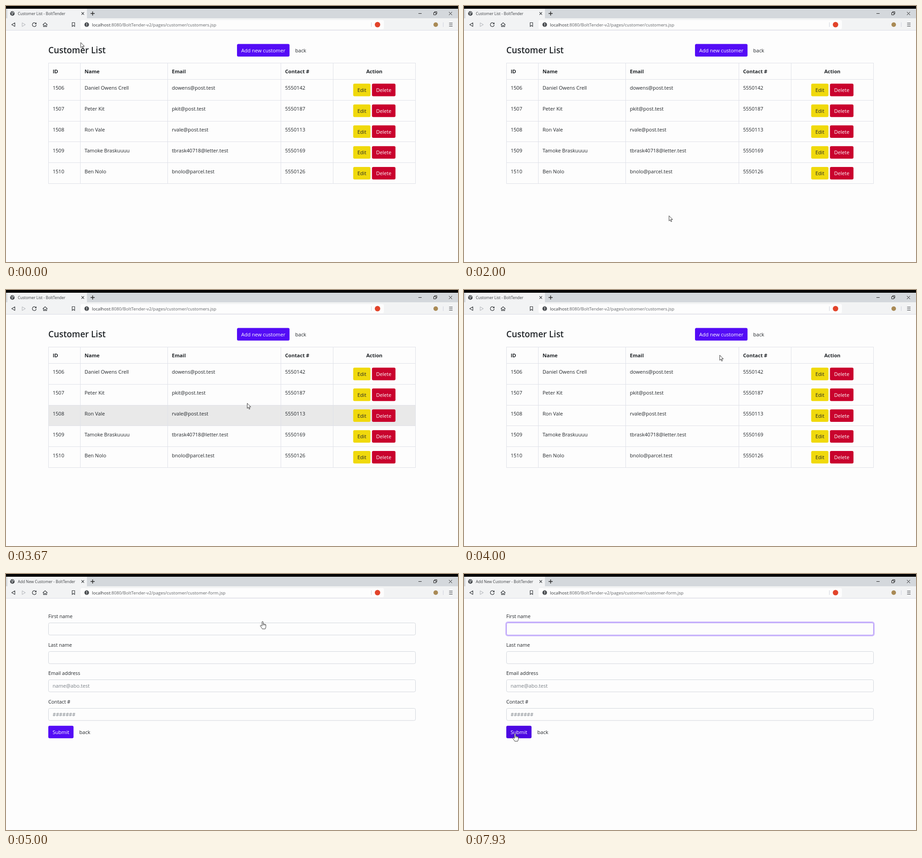
An HTML page that plays this animation: 994x563 px, repeating every 8000 ms.

```html
<!DOCTYPE html>
<html lang="en">
<head>
<meta charset="utf-8">
<title>Customer admin</title>
<style>
html, body { margin: 0; width: 100%; height: 100%; overflow: hidden; background: #fdfdfd; }
svg { display: block; width: 100vw; height: 100vh; }
text { font-family: "Open Sans", "Noto Sans", sans-serif; font-size: 11.1px; fill: #212529; white-space: pre; }
</style>
</head>
<body>
<svg id="stage" viewBox="0 0 994 563"></svg>
<script>
const LOOP = 8000;
const PAGE_SWITCH = 4870, FOCUS = 5960, CARET_HALF = 530;
const HOVER_LAG = 30;
const PRIMARY = '#540cf6', PRIMARY_HOVER = '#4c08e2', LINE = '#dfe1e8';
const APP = 'BoltTender';

const stage = document.getElementById('stage');

function add(parent, tag, attrs, content) {
  const node = document.createElementNS('http://www.w3.org/2000/svg', tag);
  for (const key in attrs) node.setAttribute(key, attrs[key]);
  if (content !== undefined) node.textContent = content;
  parent.appendChild(node);
  return node;
}
const group = (parent, attrs = {}) => add(parent, 'g', attrs);
const rect = (parent, x, y, width, height, fill, more = {}) =>
  add(parent, 'rect', { x, y, width, height, fill, ...more });
const text = (parent, x, y, content, more = {}) => add(parent, 'text', { x, y, ...more }, content);
const stroke = (parent, d, color, width = 1, more = {}) =>
  add(parent, 'path', { d, fill: 'none', stroke: color, 'stroke-width': width, ...more });
const circle = (parent, cx, cy, r, fill) => add(parent, 'circle', { cx, cy, r, fill });
const show = (node, on) => node.setAttribute('visibility', on ? 'visible' : 'hidden');

function button(parent, x, y, w, label, fill, color) {
  const box = rect(parent, x, y, w, 27.6, fill, { rx: 3 });
  text(parent, x + w / 2, y + 18.2, label, { 'text-anchor': 'middle', style: `fill:${color}` });
  return box;
}

// Browser window
function buildChrome() {
  const g = group(stage);
  const ink = '#3b3e42';
  rect(g, 0, 0, 994, 563, '#fdfdfd');
  rect(g, 0, 0, 994, 6, '#000');
  rect(g, 0, 6, 994, 21, '#d4d8dc');
  rect(g, 3, 6, 175, 21, '#f2f3f4');
  rect(g, 0, 27, 994, 26.5, '#f2f3f4');
  rect(g, 0, 53, 994, 1, '#dcdde6');
  rect(g, 164, 31, 667, 20, '#fdfdfd', { rx: 3 });

  circle(g, 14, 16.5, 5, '#45494d');
  stroke(g, 'M10.5 14.5l3 1 1 2-2 2M14.5 12.5l1 2 2.5 1', '#dfe1e3', 1.2);
  stroke(g, 'M166 13.7l5.6 5.6M171.6 13.7l-5.6 5.6', '#303336', 1.2);
  stroke(g, 'M186 16.5h9M190.5 12v9', '#222', 1.4);
  stroke(g, 'M907 16.5h7', '#222', 1);
  stroke(g, 'M940.5 14.5h5v5h-5zM942.5 14.5v-2h5v5h-2', '#222', 1);
  stroke(g, 'M974 13l7 7M981 13l-7 7', '#222', 1);

  stroke(g, 'M19.5 37v8l-7-4z', ink, 1.2, { 'stroke-linejoin': 'round' });
  stroke(g, 'M35.5 37v8l7-4z', '#b9bcc0', 1.1, { 'stroke-linejoin': 'round' });
  stroke(g, 'M65.5 38.2A4.3 4.3 0 1 0 66.5 41.5', ink, 1.3);
  add(g, 'path', { d: 'M67 36v4h-4z', fill: ink });
  stroke(g, 'M81 41.2l5-4.5 5 4.5M82.5 40.5v5h2.5v-3h2v3h2.5v-5', ink, 1.2);
  stroke(g, 'M145.5 36.5h5.5v8.5l-2.75-2.3-2.75 2.3z', ink, 1.2);
  circle(g, 177.5, 41, 5, '#4a4d51');
  stroke(g, 'M177.5 38v3.6M177.5 42.8v1.4', '#fff', 1.3);
  stroke(g, 'M803.5 36v10M961.5 36v10', '#cfd1dc');
  circle(g, 817, 41, 6, '#e2432a');
  circle(g, 945, 41, 5, '#a98a55');
  stroke(g, 'M974.5 37.5h7.5M974.5 41h7.5M974.5 44.5h7.5', ink, 1.2);

  const title = text(g, 26, 19.6, '', { style: 'font-size:8.45px;fill:#3c3f43' });
  const url = text(g, 189, 44.6, '', { style: 'font-size:9.65px;fill:#5f6266' });
  add(url, 'tspan', { style: 'fill:#303337' }, 'localhost');
  const path = add(url, 'tspan', {});
  return { title, path };
}

// Customer table
const COLS = [93.5, 163.5, 355.5, 604.5, 719.5, 900.5];
const ROW_TOP = 161.5, ROW_H = 45.8;
const CUSTOMERS = [
  ['1506', 'Daniel Owens Crell', 'dowens@post.test', '5550142'],
  ['1507', 'Peter Kit', 'pkit@post.test', '5550187'],
  ['1508', 'Ron Vale', 'rvale@post.test', '5550113'],
  ['1509', 'Tamoke Braskuuuu', 'tbrask40718@letter.test', '5550169'],
  ['1510', 'Ben Nolo', 'bnolo@parcel.test', '5550126']
];

function buildList() {
  const g = group(stage);
  text(g, 93, 104, 'Customer List', { style: 'font-size:18.9px;font-weight:600' });
  const addBox = button(g, 508, 83.6, 115.5, 'Add new customer', PRIMARY, '#fff');
  text(g, 636, 101.8, 'back');

  const rows = CUSTOMERS.map((customer, i) => {
    const top = ROW_TOP + i * ROW_H;
    const shade = rect(g, 93.5, top, 807, ROW_H, 'none');
    customer.forEach((cell, c) => text(g, COLS[c] + 9.2, top + 22.8, cell));
    button(g, 763.5, top + 9.3, 38, 'Edit', '#f0d90c', '#24272b');
    button(g, 804.8, top + 9.3, 51.7, 'Delete', '#c9022d', '#fff');
    return shade;
  });

  const bold = { style: 'font-weight:700' };
  ['ID', 'Name', 'Email', 'Contact #'].forEach((h, c) => text(g, COLS[c] + 9.2, 147.7, h, bold));
  text(g, 810, 147.7, 'Action', { ...bold, 'text-anchor': 'middle' });

  let grid = 'M93 125.5H901';
  for (let i = 0; i <= CUSTOMERS.length; i++) grid += `M93 ${Math.floor(ROW_TOP + i * ROW_H) + 0.5}H901`;
  for (const x of COLS) grid += `M${x} 125V391`;
  stroke(g, grid, LINE);
  return { g, addBox, rows };
}

// New customer form
const FIELDS = [
  ['First name', ''],
  ['Last name', ''],
  ['Email address', 'name@abo.test'],
  ['Contact #', '#######']
];
const fieldTop = i => 107 + i * 62.5;

function buildForm() {
  const g = group(stage);
  const glow = rect(g, 92.3, 105.9, 809.4, 29.7, 'none', { rx: 4, stroke: PRIMARY, 'stroke-width': 2.6 });
  const boxes = FIELDS.map(([label, hint], i) => {
    const y = Math.round(fieldTop(i));
    text(g, 93, y - 10.2, label, { style: 'font-size:10.8px' });
    const box = rect(g, 93.5, y + 0.5, 807, 26.7, '#fdfdfd', { rx: 3, stroke: '#d2d6dc' });
    text(g, 102.5, y + 18.3, hint, { style: 'fill:#7a8087' });
    return box;
  });
  const caret = rect(g, 102.5, 113.5, 1, 15, '#333');
  const submit = button(g, 93, 333.7, 55.5, 'Submit', PRIMARY, '#fff');
  text(g, 161.3, 352, 'back');
  return { g, glow, first: boxes[0], caret, submit };
}

// Pointer shapes, drawn around their hot spot
function buildPointers() {
  const arrow = group(stage), hand = group(stage), beam = group(stage);
  const outline = { fill: '#fff', stroke: '#222', 'stroke-width': 0.9, 'stroke-linejoin': 'round' };
  add(arrow, 'path', { d: 'M.4 .4V11.6L2.9 9.2 4.7 13.4 6.4 12.7 4.6 8.5H8.3Z', ...outline });
  add(hand, 'path', {
    d: 'M-1.5 9.5V1.6Q-1.5 .4 -.3 .4T1 1.6V6Q2.2 5 3.2 6.3Q4.5 5.5 5.2 7Q7 6.5 7 8.3V11.5Q7 14 5.5 16.8H-.8Q-2 14.5 -5 10.8Q-5.8 9.3 -4.4 8.8Q-3 8.6 -1.5 10.5Z',
    ...outline
  });
  stroke(hand, 'M1 6V9M3.2 6.5V9M5.2 7.2V9.2', '#222', 0.8);
  stroke(beam, 'M-3 -7.5H-.8L0 -6.9 .8 -7.5H3M0 -6.9V6.9M-3 7.5H-.8L0 6.9 .8 7.5H3', '#333', 1);
  return { arrow, hand, beam };
}

// Pointer path: time, x, y, and 1 where the move into the point is linear
const PATH = [
  [0, 164, 80], [200, 164, 80], [950, 440, 417], [1770, 440, 417], [1930, 450.5, 461],
  [3490, 450.5, 461], [3670, 530, 249, 1], [4000, 562, 143, 1], [4150, 564.5, 104],
  [5370, 564.5, 104], [5600, 460, 132, 1], [5900, 245, 130], [6330, 245, 130],
  [6480, 243, 207], [6640, 243, 207], [6780, 240.5, 182], [7700, 240.5, 182],
  [7900, 112.5, 351], [LOOP, 112.5, 351]
];

function pointerAt(t) {
  const i = Math.max(1, PATH.findIndex(p => p[0] >= t));
  const [t0, x0, y0] = PATH[i - 1], [t1, x1, y1, linear] = PATH[i];
  const u = Math.min(1, Math.max(0, (t - t0) / (t1 - t0)));
  const k = linear ? u : u * u * (3 - 2 * u);
  return { x: x0 + (x1 - x0) * k, y: y0 + (y1 - y0) * k };
}

const inside = (p, x, y, w, h) => p.x >= x && p.x < x + w && p.y >= y && p.y < y + h;

const chrome = buildChrome();
const list = buildList();
const form = buildForm();
const pointers = buildPointers();

function drawList(hover) {
  const row = inside(hover, 93, ROW_TOP, 808, ROW_H * 5) ? Math.floor((hover.y - ROW_TOP) / ROW_H) : -1;
  list.rows.forEach((shade, i) => shade.setAttribute('fill', i === row ? '#e9e9e9' : 'none'));
  const onAdd = inside(hover, 508, 84, 115, 27);
  list.addBox.setAttribute('fill', onAdd ? PRIMARY_HOVER : PRIMARY);
  return onAdd ? 'hand' : 'arrow';
}

function drawForm(t, hover) {
  const focus = Math.min(1, Math.max(0, (t - FOCUS) / 110));
  form.glow.setAttribute('stroke-opacity', 0.28 * focus);
  form.first.setAttribute('stroke', focus > 0.5 ? '#a98bf8' : '#d2d6dc');
  const caretOn = t >= FOCUS && Math.floor((t - FOCUS) / CARET_HALF) % 2 === 0;
  form.caret.setAttribute('opacity', caretOn ? 1 : 0);
  const onSubmit = inside(hover, 93, 334, 55, 27);
  form.submit.setAttribute('fill', onSubmit ? PRIMARY_HOVER : PRIMARY);
  // The link pointer stays until the mouse moves on the new page
  if (onSubmit || t < 5385) return 'hand';
  return FIELDS.some((f, i) => inside(hover, 93, fieldTop(i), 808, 27)) ? 'beam' : 'arrow';
}

function draw(t) {
  const onForm = t >= PAGE_SWITCH;
  const at = pointerAt(t), hover = pointerAt(Math.max(0, t - HOVER_LAG));
  show(list.g, !onForm);
  show(form.g, onForm);
  chrome.title.textContent = `${onForm ? 'Add New Customer' : 'Customer List'} - ${APP}`;
  chrome.path.textContent = `:8080/${APP}-v2/pages/customer/${onForm ? 'customer-form' : 'customers'}.jsp`;

  const shape = onForm ? drawForm(t, hover) : drawList(hover);
  for (const name in pointers) show(pointers[name], name === shape);
  pointers[shape].setAttribute('transform', `translate(${at.x.toFixed(2)} ${at.y.toFixed(2)})`);
}

const start = performance.now();
function tick() {
  draw((performance.now() - start) % LOOP);
  requestAnimationFrame(tick);
}
tick();
</script>
</body>
</html>
```
